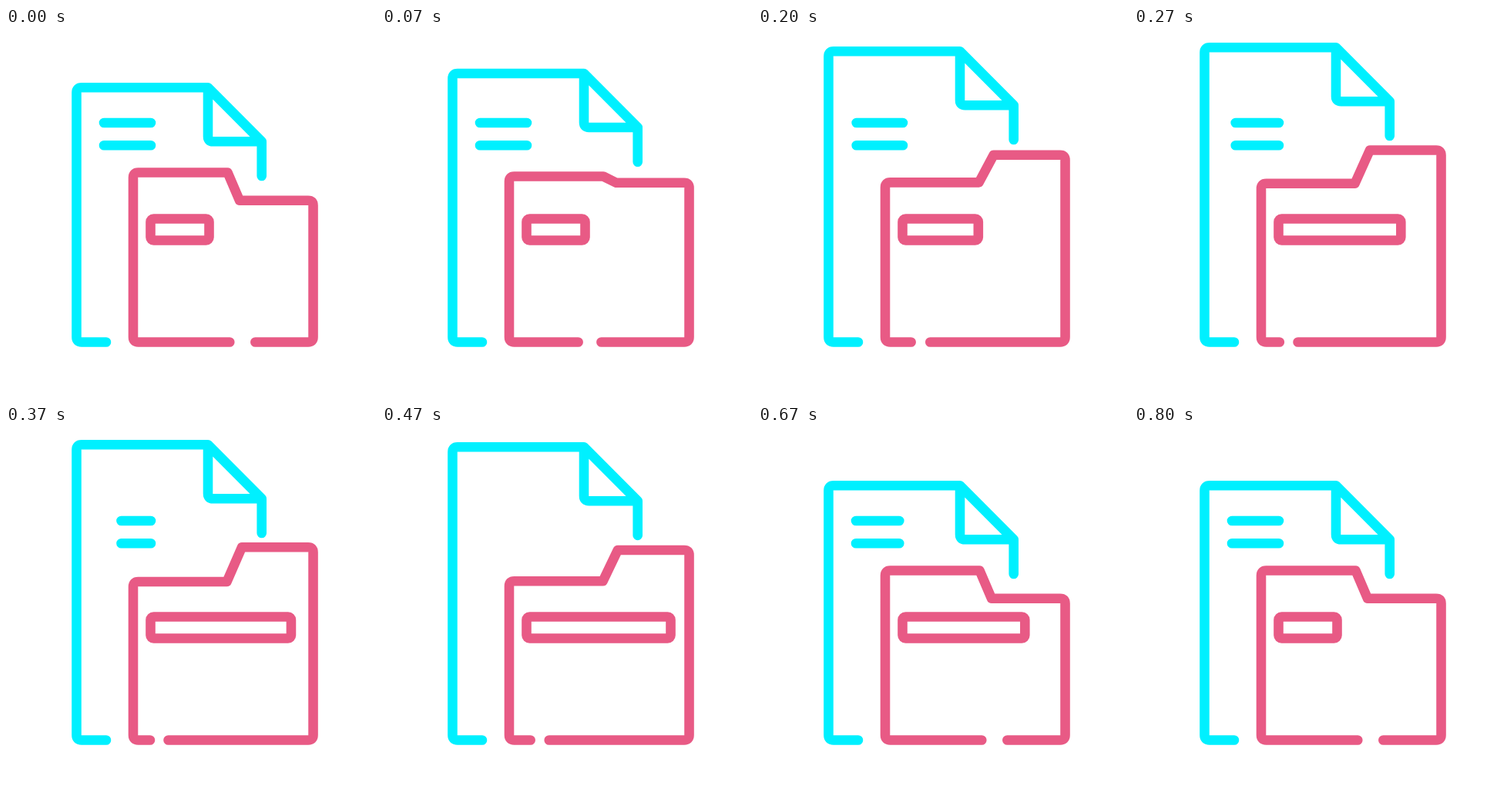
Write an HTML page that moves like this. It is 480 by 480 pixels and loops after 1530 ms.

```html
<!DOCTYPE html>
<html lang="en">
<head>
<meta charset="utf-8">
<title>File and folder</title>
<style>
  html, body { margin: 0; width: 100%; height: 100%; overflow: hidden; background: #fff; }
  svg { display: block; width: 100vw; height: 100vh; }
  path, rect { fill: none; stroke-width: 12.6; stroke-linecap: round; stroke-linejoin: round; }
  .page { stroke: #00f0ff; }
  .folder { stroke: #e85a85; }
</style>
</head>
<body>
<svg viewBox="0 0 480 480">
  <path id="page" class="page"/>
  <path id="lines" class="page"/>
  <path id="folder" class="folder"/>
  <rect id="label" class="folder" x="187.5" y="247.5" height="28" rx="4"/>
</svg>
<script>
const LOOP = 1530, LAST = 24;
// How far the sheet is raised at each tick: up, hold, down.
const LIFT = [0, .175, .345, .51, .66, .785, .887, .947, .982, .996, 1,
  1, 1, .985, .945, .86, .728, .546, .36, .18, 0];

const el = id => document.getElementById(id);
const mix = (a, b, p) => a + (b - a) * p;
const clamp = x => Math.min(1, Math.max(0, x));

function bezier(x, x1, x2) {
  let lo = 0, hi = 1;
  for (let i = 0; i < 30; i++) {
    const m = (lo + hi) / 2, n = 1 - m;
    if (3 * x1 * m * n * n + 3 * x2 * m * m * n + m ** 3 < x) lo = m; else hi = m;
  }
  return lo * lo * (3 - 2 * lo);
}

function drawPage(p) {
  const y = mix(77.3, 24.3, p);
  el('page').setAttribute('d',
    `M130 407.5H98Q91.5 407.5 91.5 401V${y + 6.5}Q91.5 ${y} 98 ${y}` +
    `H262L331.7 ${y + 70}V${y + 114.7}` +
    `M262 ${y}V${y + 63.5}Q262 ${y + 70} 268.5 ${y + 70}H331.7`);
}

function drawFolder(p) {
  const left = mix(187.5, 202, p), right = mix(223.7, 157.3, p);
  el('folder').setAttribute('d',
    `M${mix(290.3, 187, p)} 407.5H171.5Q165 407.5 165 401V${left + 6.5}` +
    `Q165 ${left} 171.5 ${left}H${mix(287.5, 286.5, p)}` +
    `L${mix(303, 306, p)} ${right}H392Q398.5 ${right} 398.5 ${right + 6.5}` +
    `V401Q398.5 407.5 392 407.5H${mix(323.3, 210.5, p)}`);
}

// The lines are wiped from the left, then written again.
function drawLines(k) {
  const from = clamp((k - 4) / 10) ** 2.8;
  const to = 1 - (1 - clamp((k - 14) / 10)) ** 2.8;
  const a = k < 14 ? mix(127, 188, from) : 127;
  const b = k > 14 ? mix(127, 188, to) : 188;
  el('lines').setAttribute('d', k === 14 ? '' : `M${a} 123H${b}M${a} 152.3H${b}`);
}

function draw(k) {
  const p = LIFT[k] || 0;
  drawPage(p);
  drawFolder(p);
  drawLines(k);
  const grow = bezier(clamp(1 - Math.abs(k - 14) / 10), .39, .03);
  el('label').setAttribute('width', 76 + 111 * grow);
}

function tick(now) {
  const t = now % LOOP;
  // 30 ticks a second, on whole hundredths
  draw(Math.min(LAST, Math.floor((Math.floor(t / 10) + .4) * .3)));
  requestAnimationFrame(tick);
}
const start = performance.now();
draw(0);
requestAnimationFrame(function run(now) {
  tick.call(null, Math.max(0, now - start));
});
</script>
</body>
</html>
```
